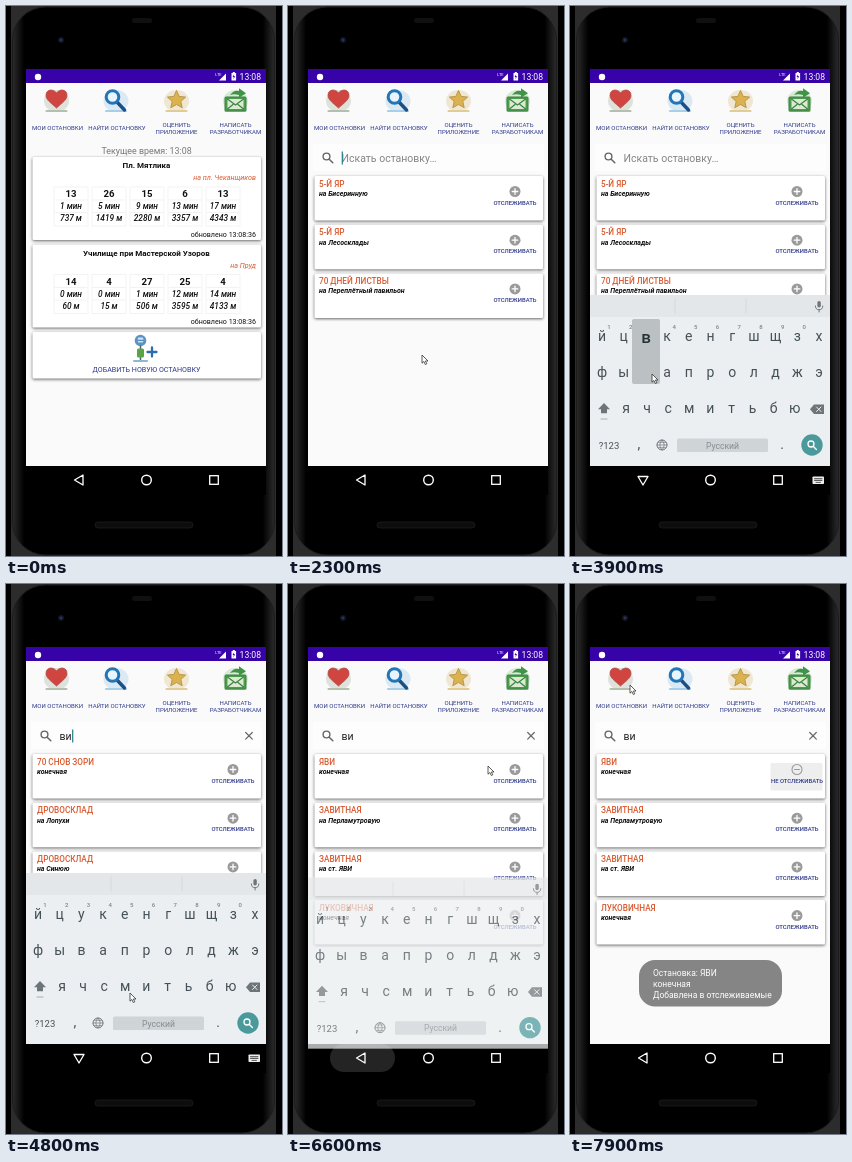
An HTML page that plays this animation: 276x550 px, repeating every 8000 ms.

```html
<!DOCTYPE html>
<html lang="ru">
<head>
<meta charset="utf-8">
<title>Остановки</title>
<style>
  html, body { margin: 0; width: 100%; height: 100%; overflow: hidden; background: #000; }
  svg { display: block; width: 100vw; height: 100vh; }
  text { font-family: Roboto, sans-serif; white-space: pre; }
  .card { fill: #fff; filter: drop-shadow(0 1.3px 1.5px #0009); }
</style>
</head>
<body>
<svg id="stage" viewBox="0 0 276 550"></svg>
<script>
const NAVY = '#2c3789', ORANGE = '#d85a30', GREY = '#9a9a9a', KEY = '#455157', PURPLE = '#3703a8';
const LOOP = 8000;

// Markup helpers
const text = (x, y, content, size, fill = '#111', anchor = 'middle', extra = '') =>
  `<text x="${x}" y="${y}" font-size="${size}" fill="${fill}" text-anchor="${anchor}" ${extra}>${content}</text>`;
const rect = (x, y, w, h, fill, rx = 0, extra = '') =>
  `<rect x="${x}" y="${y}" width="${w}" height="${h}" rx="${rx}" fill="${fill}" ${extra}/>`;
const circle = (x, y, r, fill, extra = '') => `<circle cx="${x}" cy="${y}" r="${r}" fill="${fill}" ${extra}/>`;
const line = (d, color, width = 1) =>
  `<path d="${d}" fill="none" stroke="${color}" stroke-width="${width}" stroke-linecap="round" stroke-linejoin="round"/>`;
const shape = (d, fill, extra = '') => `<path d="${d}" fill="${fill}" ${extra}/>`;
const group = (id, content, extra = '') => `<g id="${id}" ${extra}>${content}</g>`;
const card = (y, h) => rect(26.5, y, 228.5, h, '#fff', 1.5, 'class="card"');
const BOLD = 'font-weight="700"', MEDIUM = 'font-weight="500"', ITALIC = 'font-style="italic"';

function phone() {
  return '<linearGradient id="body"><stop stop-color="#2b2b2b"/><stop offset=".045" stop-color="#000"/>' +
    '<stop offset=".955" stop-color="#000"/><stop offset="1" stop-color="#2b2b2b"/></linearGradient>' +
    rect(5, 0, 265, 550, '#2c2c2c') +
    rect(6.5, 1, 262, 548, 'url(#body)', 33, 'stroke="#1c1c1c"') +
    rect(126, 12, 20, 5, '#101010', 2.5) + circle(55, 34, 3, '#101422') + circle(55, 34, 1.4, '#2a3358') +
    rect(89, 516, 98, 6, '#0d0d0d', 3, 'stroke="#1d1d1d" stroke-width=".8"') +
    rect(20, 77, 240, 383, '#fafafa') +
    rect(20, 63, 240, 14, PURPLE) + circle(32, 71, 3.2, '#fff') +
    text(212.5, 70, 'LTE', 4, '#fff') + shape('M213 74.5h7v-7z', '#fff') +
    rect(225.5, 67, 4.6, 7.5, '#fff', .6) + rect(226.8, 66, 2, 1.5, '#fff') +
    shape('M228.2 68.3l-1.7 2.8h1.3l-.4 2.2 1.8-3h-1.3z', PURPLE) +
    text(255, 74, '13:08', 8.6, '#fff', 'end');
}

function toolbar() {
  const label = (x, y, content) => text(x, y, content, 6.05, NAVY);
  // Each icon stands on a soft sketched halo
  const halo = (x, color) => `<ellipse cx="${x}" cy="95" rx="12.5" ry="11" fill="${color}" opacity=".4"/>` +
    line(`M${x - 10} 105h20`, color, 2.2);
  return halo(50.5, '#b5bfae') +
    shape('M50.5 102C45 97 40 94 40 89.3C40 83 47.5 82.5 50.5 87C53.5 82.5 61 83 61 89.3C61 94 56 97 50.5 102Z', '#d0453f', 'stroke="#b3504a" stroke-width=".8"') +
    halo(110, '#a9cfe8') + line('M111 96L118.5 104', '#1d4f86', 3.4) +
    circle(106.5, 91, 6.3, '#e6f5ff', 'stroke="#2375b6" stroke-width="3"') +
    halo(170.5, '#e2cb95') +
    shape('M170.5 84.5l2.7 5.9 6.4.7-4.8 4.3 1.4 6.3-5.7-3.2-5.7 3.2 1.4-6.3-4.8-4.3 6.4-.7z', '#dcb24f', 'stroke="#b8964f"') +
    halo(229.5, '#a9cda0') +
    rect(219, 91, 21, 14, '#4c9d4a', 1, 'stroke="#3b8148"') + rect(221.5, 93, 16, 10, '#dcebd0') +
    line('M221.5 93l8 6 8-6M221.5 103l5.5-4.5M237.5 103l-5.5-4.5', '#3b8148', 1.2) +
    shape('M224 89q4-5.5 9-4v-2.7l7 5-7 4.5v-2.8q-5-1.5-9 0z', '#3f9447') +
    label(51.5, 124.3, 'МОИ ОСТАНОВКИ') + label(111, 124.3, 'НАЙТИ ОСТАНОВКУ') +
    label(170.5, 121.3, 'ОЦЕНИТЬ') + label(170.5, 128, 'ПРИЛОЖЕНИЕ') +
    label(229.5, 121.3, 'НАПИСАТЬ') + label(229.5, 128, 'РАЗРАБОТЧИКАМ');
}

function stopCard(y, title, direction, buses) {
  const columns = buses.map(([number, minutes, metres], i) => {
    const x = 65 + i * 38;
    const detail = (dy, content) => text(x, y + dy, content, 8.3, '#111', 'middle', `${ITALIC} ${MEDIUM}`);
    return rect(x - 17, y + 30, 34, 39, 'none', 0, 'stroke="#f1f1f1" stroke-width=".8"') +
      line(`M${x - 16} ${y + 43}h32M${x - 16} ${y + 55.5}h32`, '#ececec', .7) +
      text(x, y + 40, number, 9.6, '#111', 'middle', BOLD) +
      detail(52.3, minutes + ' мин') + detail(64.3, metres + ' м');
  });
  return card(y, 83) + text(140.5, y + 11, title, 8, '#111', 'middle', BOLD) +
    text(250, y + 23, 'на ' + direction, 7.2, ORANGE, 'end', ITALIC) + columns.join('') +
    text(250, y + 79.5, 'обновлено 13:08:36', 7.1, '#111', 'end');
}

function home() {
  return text(140.5, 147.7, 'Текущее время: 13:08', 8.9, '#777') +
    stopCard(151, 'Пл. Мятлика', 'пл. Чеканщиков',
      [[13, 1, 737], [26, 5, 1419], [15, 9, 2280], [6, 13, 3357], [13, 17, 4343]]) +
    stopCard(238.5, 'Училище при Мастерской Узоров', 'Пруд',
      [[14, 0, 60], [4, 0, 15], [27, 1, 506], [25, 12, 3595], [4, 14, 4133]]) +
    card(326, 46.5) +
    circle(134.5, 334.5, 5.8, '#5c93c4') + rect(131.8, 331.5, 5.4, 5, '#cfe2f2', 1) +
    line('M132 334.3h5', '#3679b8', 1) + line('M134.5 340v15', '#4c6570', 1.5) +
    rect(131, 342.5, 7, 9, '#5aa345', 1.5) + line('M128 355h13', '#8fb7cf', 2) +
    line('M146 341.5v9M141.5 346h9', '#2d6cad', 2.3) +
    text(140.5, 366, 'ДОБАВИТЬ НОВУЮ ОСТАНОВКУ', 7.15, NAVY);
}

const track = (y, id) => group(id, circle(227, y + 15.5, 5.5, GREY) +
  line(`M227 ${y + 12.7}v5.6M224.2 ${y + 15.5}h5.6`, '#fff', 1.3) +
  text(227, y + 28.5, 'ОТСЛЕЖИВАТЬ', 5.9, NAVY, 'middle', MEDIUM));

const results = (id, rows) => group(id, rows.map(([title, note], i) => {
  const y = 170 + i * 48.7;
  return card(y, 44.5) + text(31, y + 10.5, title, 8.2, ORANGE, 'start', MEDIUM) +
    text(31, y + 20, note, 7, '#111', 'start', `${ITALIC} ${BOLD}`) +
    track(y, id + 'Track' + i);
}).join(''));

function search() {
  return rect(25, 138, 231, 27, '#fdfdfd') +
    circle(38.5, 150.5, 3.4, 'none', 'stroke="#666" stroke-width="1.4"') + line('M41.2 153.2l3.6 3.6', '#666', 1.5) +
    text(53.5, 156, 'Искать остановку…', 10.5, '#858585', 'start', 'id="hint"') +
    text(53.5, 156, '', 10.5, '#222', 'start', 'id="query"') +
    group('clear', line('M239.7 148.5l6.6 6.6M246.3 148.5l-6.6 6.6', '#666', 1.2)) +
    rect(0, 145.5, 1.2, 13, '#26798c', 0, 'id="caret"') +
    results('all', [['5-Й ЯР', 'на Бисеринную'], ['5-Й ЯР', 'на Лесосклады'], ['70 ДНЕЙ ЛИСТВЫ', 'на Переплётный павильон']]) +
    results('one', [['70 СНОВ ЗОРИ', 'конечная'], ['ДРОВОСКЛАД', 'на Лопухи'], ['ДРОВОСКЛАД', 'на Синюю']]) +
    results('two', [['ЯВИ', 'конечная'], ['ЗАВИТНАЯ', 'на Перламутровую'], ['ЗАВИТНАЯ', 'на ст. ЯВИ'], ['ЛУКОВИЧНАЯ', 'конечная']]) +
    group('untrack', rect(200.5, 179, 52, 27.5, '#eeeeef', 1) +
      circle(227, 185.5, 5, 'none', `stroke="${GREY}" stroke-width="1.1"`) + line('M224.5 185.5h5', GREY, 1.1) +
      text(227, 198.7, 'НЕ ОТСЛЕЖИВАТЬ', 5.9, NAVY, 'middle', MEDIUM));
}

function keyboard() {
  const row = (letters, x, y, step) =>
    [...letters].map((letter, i) => text(x + i * step, y, letter, 14, KEY)).join('');
  const digits = [...'1234567890'].map((d, i) => text(39 + i * 21.7, 322.5, d, 6, '#7b858a', 'middle', MEDIUM)).join('');
  return rect(20, 289, 240, 171, '#eceff1') + rect(20, 289, 240, 22, '#e4e7e9') +
    line('M105 293v14M176 293v14', '#d2d6d9', .8) +
    rect(247.4, 295, 3.4, 6.5, '#6d7579', 1.7) + line('M245.4 300q0 3.7 3.7 3.7t3.7-3.7M249.1 304v2', '#6d7579', 1) +
    row('йцукенгшщзх', 32, 335, 21.7) + digits + row('фывапролджэ', 32, 371, 21.7) + row('ячсмитьбю', 56, 407, 21.1) +
    shape('M34 397l-6 6.3h3v4h6v-4h3z', '#6d7579') + line('M31 413h6', '#a5adb1', 1) +
    shape('M240 403.3l4-4.8h10v9.6h-10z', '#6d7579') + line('M246.5 401l4.5 4.5M251 401l-4.5 4.5', '#eceff1', 1) +
    text(39, 443, '?123', 9.5, KEY) + text(69, 443, ',', 14, KEY) + text(212, 443, '.', 14, KEY) +
    circle(92, 439, 5, 'none', 'stroke="#6d7579"') +
    line('M87 439h10M92 434q-4.5 5 0 10q4.5-5 0-10M88.5 436.3h7M88.5 441.7h7', '#6d7579', .7) +
    rect(107, 432.5, 91, 13.5, '#cfd4d7', 1.5) + text(152.5, 442.5, 'Русский', 8.6, '#858d91') +
    circle(242, 439, 10.7, '#4a9a9c') +
    circle(241, 438, 3, 'none', 'stroke="#fff" stroke-width="1.3"') + line('M243.4 440.4l3 3', '#fff', 1.4);
}

const popup = (id, letter, x, y) => group(id, rect(x - 14, y, 28, 65, '#bbc0c3', 2) +
  text(x, y + 24, letter, 17, '#263238', 'middle', MEDIUM));

function navigation() {
  return rect(20, 460, 240, 29, '#000') + rect(42, 460, 65, 28, '#fff', 14, 'id="ripple"') +
    group('back', line('M68.5 474l8.5-5v10z', '#fff', 1.3)) +
    group('hide', line('M73 479l-5-8.5h10z', '#fff', 1.3) + rect(242.5, 470.5, 11.5, 7.5, '#eee', .8) +
      line('M244.5 472.7h7.5M244.5 474.4h7.5', '#222', .8) + line('M246 476.4h4.5', '#222', .7)) +
    circle(140.5, 474, 4.8, 'none', 'stroke="#fff" stroke-width="1.4"') +
    rect(203.7, 469.7, 8.6, 8.6, 'none', 0, 'stroke="#fff" stroke-width="1.3"');
}

const toast = () => rect(69, 376, 143, 46.5, '#858585', 16) +
  ['Остановка: ЯВИ', 'конечная', 'Добавлена в отслеживаемые']
    .map((content, i) => text(83, 391.7 + i * 11, content, 8.5, '#fff', 'start')).join('');

document.getElementById('stage').innerHTML =
  '<clipPath id="screen"><rect x="20" y="63" width="240" height="397"/></clipPath>' +
  phone() + '<g clip-path="url(#screen)">' + toolbar() + group('home', home()) + group('search', search()) + '</g>' +
  navigation() + group('keyboard', keyboard()) +
  popup('popupV', 'в', 76, 313) + popup('popupI', 'и', 140.5, 349) + group('toast', toast()) +
  group('pointer', shape('M0 0v8.2l1.9-1.7 1.4 3 1.5-.7-1.4-2.8h2.6z', '#fff', 'stroke="#333" stroke-width=".8"'));

const el = id => document.getElementById(id);
const show = (id, visible) => { el(id).style.display = visible ? '' : 'none'; };
const progress = (t, from, to) => Math.min(1, Math.max(0, (t - from) / (to - from)));
const ease = p => p * p * (3 - 2 * p);

// Pointer tip: time, x, y
const PATH = [
  [1700, 146, 362], [1800, 134, 349], [2300, 134, 349], [2600, 170, 405], [3100, 170, 405],
  [3700, 82, 368], [4050, 82, 368], [4450, 139, 401], [4600, 139, 401], [4800, 124, 409],
  [5700, 100, 448], [6100, 73, 471], [6400, 73, 471], [6600, 200, 182], [6750, 224, 187],
  [7400, 224, 187], [7850, 60, 101]
];

function pointerAt(t) {
  const next = PATH.findIndex(point => point[0] > t);
  if (next < 1) return PATH[next < 0 ? PATH.length - 1 : 0].slice(1);
  const [t0, x0, y0] = PATH[next - 1], [t1, x1, y1] = PATH[next];
  const p = ease((t - t0) / (t1 - t0));
  return [x0 + (x1 - x0) * p, y0 + (y1 - y0) * p];
}

function render(t) {
  const searching = t >= 2300;
  const query = t < 4050 ? '' : t < 4600 ? 'в' : 'ви';
  show('home', !searching);
  show('search', searching);
  show('hint', !query);
  show('clear', query);
  el('query').textContent = query;
  show('all', t < 4200);
  show('one', t >= 4200 && t < 4900);
  show('two', t >= 4900);

  const lastInput = t < 4050 ? 2300 : t < 4600 ? 4050 : 4600;
  show('caret', searching && t < 6500 && (t - lastInput) % 1000 < 500);
  el('caret').setAttribute('x', 53.7 + query.length * 6.2);

  const entering = ease(progress(t, 2300, 2480));
  const leaving = progress(t, 6520, 6780);
  show('keyboard', searching && leaving < 1);
  el('keyboard').setAttribute('opacity', entering * (1 - leaving * .9));
  el('keyboard').setAttribute('transform', `translate(0 ${(1 - entering + leaving) * 15})`);
  show('popupV', t >= 3900 && t < 4050);
  show('popupI', t >= 4480 && t < 4600);

  const typing = t >= 2400 && t < 6550;
  show('hide', typing);
  show('back', !typing);
  el('ripple').setAttribute('opacity', .14 * progress(t, 6350, 6450) * (1 - progress(t, 6620, 6800)));

  const tracked = t >= 6950;
  show('untrack', tracked);
  show('twoTrack0', !tracked);
  el('toast').setAttribute('opacity', progress(t, 6980, 7100));

  show('pointer', t >= 1700);
  el('pointer').setAttribute('transform', `translate(${pointerAt(t)})`);
}

function tick() {
  render(performance.now() % LOOP);
  requestAnimationFrame(tick);
}
tick();
</script>
</body>
</html>
```
